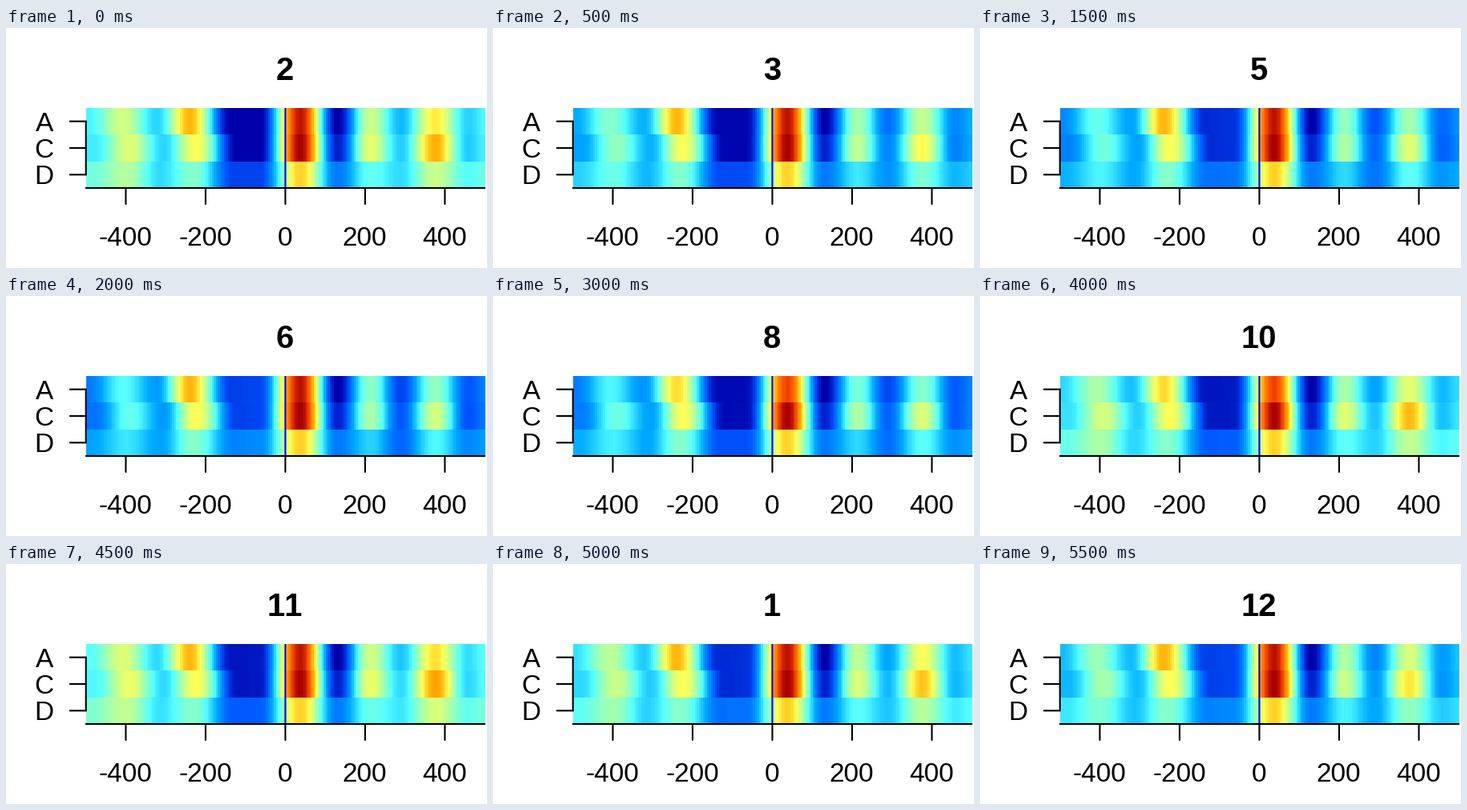
A matplotlib script that plays this animation: 600 px wide and 300 px high, repeating every 6000 ms.

```python
import numpy as np
import matplotlib.pyplot as plt
from matplotlib.animation import FuncAnimation
from matplotlib.colors import LinearSegmentedColormap

W, H, DPI = 600, 300, 100
LEFT, RIGHT, TOP, BOTTOM = 99.7, 597.2, 100, 200
BINS = 200
LINE = 2.08 * 72 / DPI

plt.rcParams["font.family"] = "Liberation Sans"
plt.rcParams["text.kerning_factor"] = 6

RAMP = LinearSegmentedColormap.from_list("ramp", [
    "#0000aa", "#0055ff", "#00aaff", "#55ffff", "#aaffaa",
    "#ffff55", "#ffaa00", "#ff5500", "#aa0000"])

TITLES = [*range(2, 12), 1, 12]

# Shared extrema in pixels; each row has its levels at the calmest moment.
KNOTS = [102, 146, 188, 229, 280, 316, 367, 413, 454, 492, 535, 576, 598]
ROWS = {
    "A": [.18, .38, .23, .73, .00, .00, .97, .00, .46, .10, .47, .13, .19],
    "C": [.17, .40, .23, .62, .00, .00, 1.0, .05, .50, .13, .56, .12, .18],
    "D": [.24, .34, .24, .45, .10, .10, .69, .18, .31, .15, .37, .20, .23],
}
LEFT_SHIFT = {"A": 0, "C": 8, "D": 4}
CENTRES = LEFT + (np.arange(BINS) + .5) * (RIGHT - LEFT) / BINS


def px(value):
    """Horizontal pixel of a value on the -500..500 axis."""
    return LEFT + (value + 500) / 1000 * (RIGHT - LEFT)


def ease_through(knots, levels):
    """Cosine easing from one extremum to the next."""
    x = np.clip(CENTRES, knots[0], knots[-1])
    i = np.clip(np.searchsorted(knots, x) - 1, 0, len(knots) - 2)
    u = (x - knots[i]) / (knots[i + 1] - knots[i])
    return levels[i] + (levels[i + 1] - levels[i]) * (1 - np.cos(np.pi * u)) / 2


def profile(row, step):
    keys = [0, 1, 4, 6, 7, 9, 11]
    swell = np.interp(step, keys, [.9, .35, 0, .08, .65, 1, .5])
    lift = np.interp(step, keys, [0, .1, 1, .2, .4, .35, 1])
    dip = np.exp(-(step - 7) ** 2) if row == "A" else 0

    knots = np.array(KNOTS, float)
    # The flanks swell; the long trough before zero lifts on its own.
    flank = np.clip((abs(knots - 320) - 95) / 80, 0, 1)
    trough = np.exp(-((knots - 300) / 35) ** 2)
    levels = np.array(ROWS[row]) + .2 * swell * flank + .13 * lift * trough
    knots[:5] += LEFT_SHIFT[row]
    return ease_through(knots, levels * (1 - .2 * dip))


def heat(step):
    return np.array([profile(row, step) for row in ROWS])


fig = plt.figure(figsize=(W / DPI, H / DPI), dpi=DPI, facecolor="white")
ax = fig.add_axes([0, 0, 1, 1])
image = ax.imshow(heat(0), cmap=RAMP, vmin=0, vmax=1, aspect="auto",
                  interpolation="nearest", extent=(LEFT, RIGHT, BOTTOM, TOP))
ax.set(xlim=(0, W), ylim=(H, 0))
ax.axis("off")


def line(xs, ys, color="black", cap="round"):
    ax.plot(xs, ys, color=color, lw=LINE, snap=False,
            solid_capstyle=cap, solid_joinstyle="round")


def label(x, y, text, size=24, align="center", **style):
    return ax.text(x, y, text, size=size, ha=align, va="baseline", **style)


line([px(0)] * 2, [TOP, BOTTOM], "blue", "butt")
line([LEFT, RIGHT], [BOTTOM] * 2)
for value in range(-400, 401, 200):
    line([px(value)] * 2, [BOTTOM, BOTTOM + 20])
    label(px(value) - .5, 272, str(value))

row_height = (BOTTOM - TOP) / len(ROWS)
row_centres = [TOP + (k + .5) * row_height for k in range(len(ROWS))]
line([LEFT] * 2, [row_centres[0], row_centres[-1]])
for name, y in zip(ROWS, row_centres):
    line([LEFT - 20, LEFT], [y, y])
    label(59, y + 12, name, align="right")

title = label(px(0) - .5, 65, "", size=28.8, weight="bold")


def update(step):
    image.set_data(heat(step))
    title.set_text(str(TITLES[step]))
    return image, title


anim = FuncAnimation(fig, update, frames=len(TITLES), interval=500,
                     repeat=True, repeat_delay=0)
plt.show()
```
